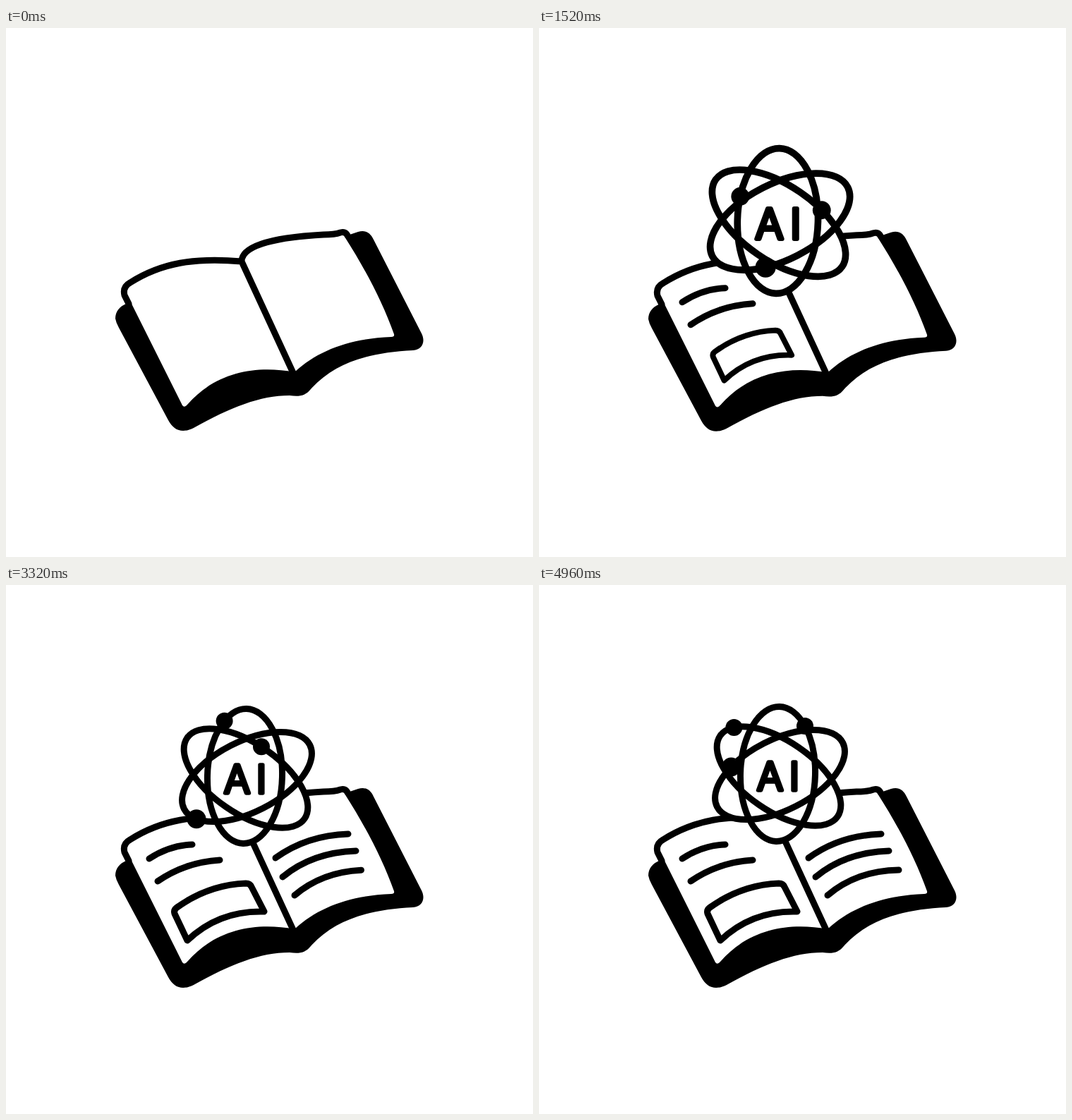
Animation of 747x750 px, one loop 5 s. Source, as an HTML page:

```html
<!DOCTYPE html>
<html lang="en">
<head>
<meta charset="utf-8">
<title>Book and atom</title>
<style>
  html, body { margin: 0; width: 100%; height: 100%; overflow: hidden; background: #fff; }
  svg { display: block; width: 100%; height: 100%; }
  .ink { fill: none; stroke: #000; stroke-width: 9; stroke-linecap: round; stroke-linejoin: round; }
  .label { font: 300 55px Inter, sans-serif; text-anchor: middle; stroke: #000; stroke-width: 5.5; stroke-linejoin: round; }
</style>
</head>
<body>
<svg viewBox="0 0 747 750">
  <g id="book">
    <path d="M170 391 C161 395 155 402 155 412 Q156 418 160 425 L230 556 C238 571 250 575 266 567
             C318 538 360 521 402 521 C415 523 424 522 432 512 C466 474 515 460 577 457
             C590 456 595 445 589 433 L521 300 C516 289 508 286 499 289 L484 294 L480 296
             C510 343 534 389 550 434 Q551 438 546 438 C490 440 443 456 409 488
             C355 478 298 487 257 534 Q252 540 249 533 L177 389 Z"/>
    <path class="ink" d="M174 391 L168 379 Q165 367 176 361 C220 333 268 325 334 331 L407 489
                         M334 331 C334 306 392 296 450 293 Q466 293 474 290 Q481 288 484 294"/>
    <g class="ink" id="lines">
      <path d="M203 388 Q232 369 264 368"/>
      <path d="M215 420 Q254 393 303 390"/>
      <path d="M382 387 Q426 355 485 353"/>
      <path d="M392 414 Q434 379 496 377"/>
      <path d="M409 440 Q450 405 510 404"/>
    </g>
    <path class="ink" id="box" d="M244 456 Q288 425 340 423 Q346 423 348 428 L366 463 Q302 461 257 504 L239 466 Q237 460 244 456 Z"/>
  </g>
  <g id="atom">
    <g id="fills" fill="#fff"></g>
    <g id="rings" class="ink"></g>
    <g id="dots"></g>
    <text class="label" y="23.5"><tspan x="-12.5">A</tspan><tspan x="22">I</tspan></text>
  </g>
</svg>
<script>
const LOOP = 5000, TURN = 2000;
const $ = id => document.getElementById(id);

// Centre, half axes, tilt, dot radius, direction and starting angle in degrees
const orbits = [
  { x: -1.5, y: 0, a: 53, b: 95.5, tilt: 1.5, r: 12, dir: -1, start: 209 },
  { x: 0, y: 3, a: 49.5, b: 101, tilt: -55.5, r: 12, dir: 1, start: -154 },
  { x: 1.5, y: 1, a: 50, b: 100, tilt: 63, r: 13.5, dir: -1, start: 39 }
];

// Start and end of each pen stroke
const spans = [[360, 700], [680, 1080], [1960, 2300], [2280, 2680], [2980, 3380]];

// Height of the atom at every 400 ms, from 1200 ms on
const bob = [254, 275.5, 254, 284.5];

const rad = d => d * Math.PI / 180;
const clamp = p => Math.min(1, Math.max(0, p));
const smooth = p => p * p * (3 - 2 * p);
const ease = (t, from, to) => smooth(clamp((t - from) / (to - from)));

function add(parent, name, attrs) {
  const el = document.createElementNS("http://www.w3.org/2000/svg", name);
  for (const key in attrs) el.setAttribute(key, attrs[key]);
  return $(parent).appendChild(el);
}

for (const o of orbits) {
  const shape = { rx: o.a, ry: o.b, transform: `translate(${o.x} ${o.y}) rotate(${o.tilt})` };
  add("fills", "ellipse", shape);
  add("rings", "ellipse", shape);
  o.dot = add("dots", "circle", { r: o.r });
}

const strokes = [...$("lines").children];
strokes.forEach(s => s.setAttribute("pathLength", 1));

// Jump, fall, then a damped bounce
function bookY(t) {
  const top = 520, land = 713;
  if (t < top) return -97 * ease(t, 0, top);
  if (t < land) {
    const p = (t - top) / (land - top);
    return -97 * (1 - smooth(p) + 0.44 * p * p * (1 - p));
  }
  const s = (t - land) / 1000;
  return 11.3 * Math.exp(-2.4 * s) * Math.sin(6 * Math.PI * s);
}

function atomY(t) {
  const k = Math.max(0, (t - 1200) / 400), i = Math.floor(k);
  const from = bob[i % 4], to = bob[(i + 1) % 4];
  return from + (to - from) * (1 - Math.cos(Math.PI * (k - i))) / 2;
}

const atomScale = t => 1.12 * ease(t, 1160, 1400) - 0.12 * ease(t, 1400, 1700);

// Nearly constant speed along the ellipse
function placeDot(o, t) {
  const s = rad(o.start) + o.dir * 2 * Math.PI * t / TURN;
  const f = s + (o.b - o.a) / (o.b + o.a) / 2 * Math.sin(2 * s);
  const px = o.a * Math.sin(f), py = -o.b * Math.cos(f);
  const c = Math.cos(rad(o.tilt)), n = Math.sin(rad(o.tilt));
  o.dot.setAttribute("cx", o.x + px * c - py * n);
  o.dot.setAttribute("cy", o.y + px * n + py * c);
}

function show(el, on) {
  el.setAttribute("visibility", on ? "visible" : "hidden");
}

function draw(t) {
  $("book").setAttribute("transform", `translate(0 ${bookY(t)})`);
  strokes.forEach((el, i) => {
    const p = ease(t, ...spans[i]);
    show(el, p > 0);
    el.setAttribute("stroke-dasharray", p < 1 ? `${p} 2` : "none");
  });
  const size = ease(t, 1240, 1600);
  show($("box"), size > 0);
  $("box").setAttribute("transform", `translate(302 463) scale(${size}) translate(-302 -463)`);
  const scale = atomScale(t);
  show($("atom"), scale > 0);
  $("atom").setAttribute("transform", `translate(340 ${atomY(t)}) scale(${scale})`);
  orbits.forEach(o => placeDot(o, t));
}

const begin = performance.now();
function tick() {
  draw((performance.now() - begin) % LOOP);
  requestAnimationFrame(tick);
}
draw(0);
requestAnimationFrame(tick);
</script>
</body>
</html>
```
